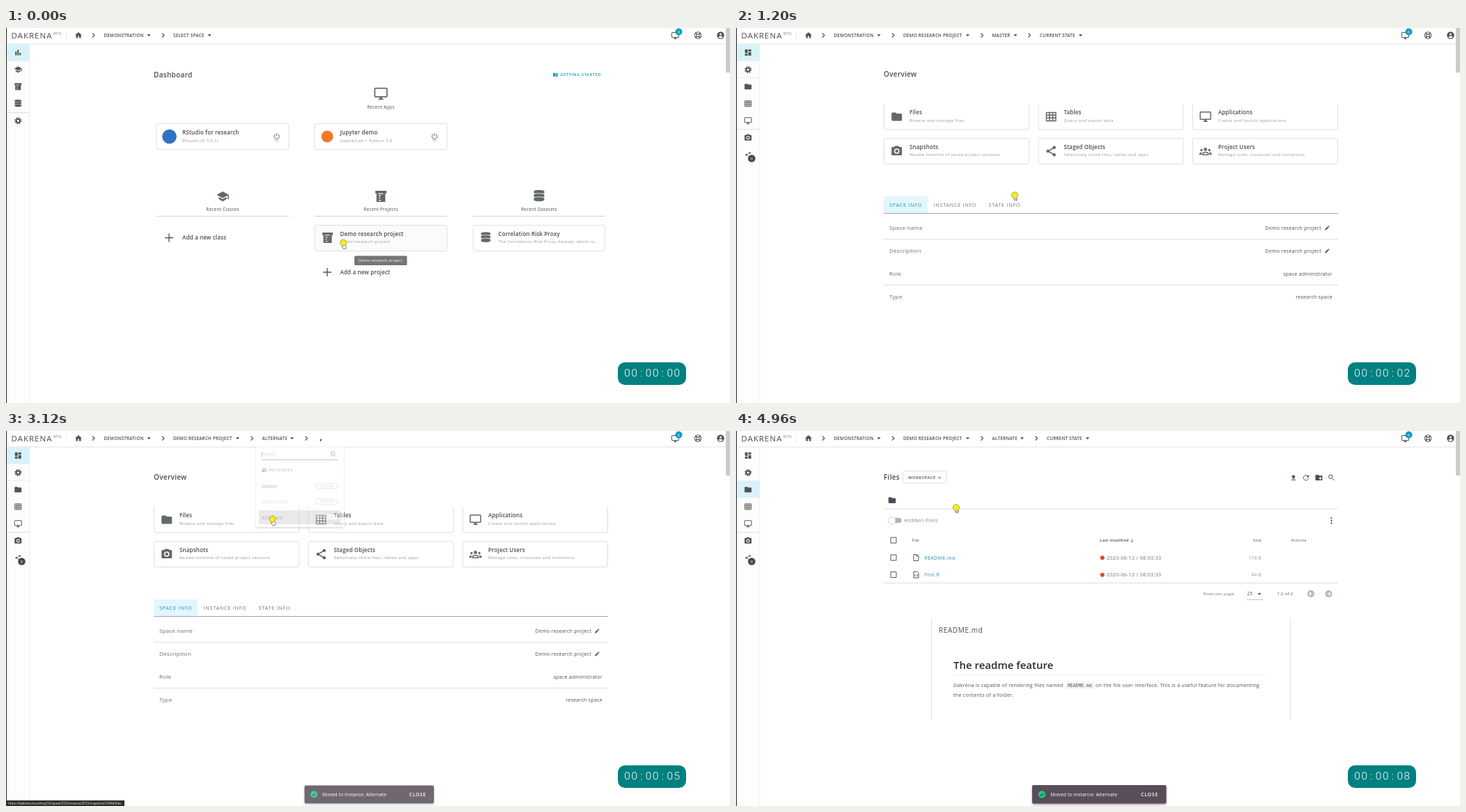
An HTML page that plays this animation: 1039x539 px, repeating every 5440 ms.

```html
<!DOCTYPE html>
<html lang="en">
<head>
<meta charset="utf-8">
<title>Workspace walkthrough</title>
<style>
html, body { margin: 0; width: 100%; height: 100%; overflow: hidden; background: #fff; }
svg { display: block; width: 1039px; height: 539px; font-family: "Open Sans", "Noto Sans", sans-serif; }
text { fill: #4c4c4c; white-space: pre; }
.icon { fill: currentColor; }
.icon .line { fill: none; stroke: currentColor; stroke-width: 2; }
.title { font-size: 10px; font-weight: 600; letter-spacing: .3px; }
.head { font-size: 8px; font-weight: 600; letter-spacing: .15px; }
.sub { font-size: 6px; letter-spacing: .38px; fill: #959595; }
.nav { font-size: 6.3px; font-weight: 600; letter-spacing: .24px; }
.cap { font-size: 6.2px; letter-spacing: .35px; text-anchor: middle; }
.tab { font-size: 7px; letter-spacing: .87px; fill: #707070; }
.lab { font-size: 8px; letter-spacing: .26px; fill: #6a6a6a; }
.val { font-size: 7px; letter-spacing: .29px; }
.para { font-size: 7px; letter-spacing: .33px; }
.cell { font-size: 7px; letter-spacing: .38px; fill: #707070; }
.small { font-size: 6px; letter-spacing: .24px; }
.row { font-size: 6.6px; letter-spacing: .22px; }
.status { font-size: 4.55px; fill: #e8e8e8; }
.end { text-anchor: end; }
</style>
</head>
<body>
<script>
const LOOP = 5440, STEP = 80;
const INK = '#505550', LEAF = '#626b63', TEAL = '#1592b5', RULE = '#dedede';

const text = (x, y, str, cls, extra = '') => `<text x="${x}" y="${y}" class="${cls}" ${extra}>${str}</text>`;
const rect = (x, y, w, h, fill, extra = '') => `<rect x="${x}" y="${y}" width="${w}" height="${h}" fill="${fill}" ${extra}/>`;
const circle = (x, y, r, fill, extra = '') => `<circle cx="${x}" cy="${y}" r="${r}" fill="${fill}" ${extra}/>`;
const path = (d, extra = '') => `<path d="${d}" ${extra}/>`;
const stroke = (d, color, width = 1) => path(d, `fill="none" stroke="${color}" stroke-width="${width}"`);
const hline = (x1, x2, y, color = RULE) => stroke(`M${x1} ${y}H${x2}`, color);
const group = (id, body, hidden) => `<g id="${id}" ${hidden ? 'display="none"' : ''}>${body}</g>`;
const line = (d, extra = '') => path(d, `class="line" ${extra}`);
const ring = (x, y, r, extra = '') => circle(x, y, r, 'none', `class="line" ${extra}`);

// Icons live in a 24 x 24 box.
const head = (x, y, r) => circle(x, y, r, 'currentColor');
const icons = {
  home: path('M10 20v-6h4v6h5v-8h3L12 3 2 12h3v8z'),
  chart: path('M4 9h4v11H4zM10 4h4v16h-4zM16 13h4v7h-4z'),
  board: path('M3 13h8V3H3zM3 21h8v-6H3zM13 21h8V11h-8zM13 3v6h8V3z'),
  gear: ring(12, 12, 5.2, 'style="stroke-width:4"') + ring(12, 12, 8.2, 'style="stroke-width:4" stroke-dasharray="3.2 3.24"'),
  folder: path('M10 4H4q-2 0-2 2v12q0 2 2 2h16q2 0 2-2V8q0-2-2-2h-8z'),
  table: line('M3 4h18v16H3zM3 9h18M3 14.500h18M9 4v16M15 4v16'),
  screen: line('M3 3h18q1 0 1 1v12q0 1-1 1H3q-1 0-1-1V4q0-1 1-1zM8 21h8') + path('M10 17h4v4h-4z'),
  camera: path('M9 2 7 4H4q-2 0-2 2v12q0 2 2 2h16q2 0 2-2V6q0-2-2-2h-3l-2-2zM12 7a5 5 0 1 1 0 10a5 5 0 1 1 0-10z', 'fill-rule="evenodd"') + head(12, 12, 3),
  share: line('M18 5 6 12l12 7') + head(18, 5, 3) + head(6, 12, 3) + head(18, 19, 3),
  users: head(12, 8.5, 3.2) + head(4.5, 10, 2.2) + head(19.5, 10, 2.2) +
    line('M6.500 19v-2q1-3 5.500-3t5.500 3v2z') + path('M0 19v-2q1-3 5-3l-1 5zM24 19v-2q-1-3-5-3l1 5z'),
  pair: head(8.5, 8, 3.4) + head(16, 8, 3) + path('M1 19v-2q1-4 7.500-4t7.500 4v2zM17 13q6 0 6 4v2h-5v-2q0-2-1-4z'),
  school: path('M5 13v4l7 4 7-4v-4l-7 4zM12 3 1 9l11 6 9-5v7h2V9z'),
  project: path('M2 2h20v5h-2v15H4V7H2z') + stroke('M7 7h9M8 11h4M8 15h3M8 19h4', '#fff', 1.5),
  data: [3, 9.500, 16].map(y => path(`M2 ${y}q0-3 10-3t10 3v2q0 3.500-10 3.500T2 ${y + 2}z`, 'stroke="#fff" stroke-width="1"')).join(''),
  search: ring(9.5, 9.5, 5.5) + line('M14 14l6 6'),
  pencil: path('M3 17v4h4L18 10l-4-4zM15 5l4 4 2-2-4-4z'),
  upload: path('M5 20h14v-2H5zM9 16h6v-6h4l-7-7-7 7h4z'),
  refresh: line('M18 7a8 8 0 1 0 2 7') + path('M13 11h8V3z'),
  file: line('M5 3h9l5 5v13H5zM14 3v5h5'),
  code: line('M5 3h9l5 5v13H5z') + line('M10 11l-2 3 2 3M14 11l2 3-2 3'),
  box: line('M4 4h16v16H4z'),
  book: path('M2 5h9v15H2zM13 5h9v15h-9z') + stroke('M15 10h5M15 14h5', '#fff', 1.500),
  down: line('M12 4v15M6 13l6 6 6-6'),
  power: line('M8 5a8 8 0 1 0 8 0M12 2v9') + line('M7 25h2M11 25h2M15 25h2'),
  life: ring(12, 12, 9) + ring(12, 12, 4) + line('M5 5l4 4M19 5l-4 4M5 19l4-4M19 19l-4-4', 'style="stroke-width:3"'),
  account: head(12, 12, 10) + circle(12, 9, 3, '#fff') + path('M6 17q2-3 6-3t6 3q-2 3-6 3t-6-3z', 'fill="#fff"'),
};
const icon = (name, x, y, size, color = INK) =>
  `<g class="icon" color="${color}" transform="translate(${x - size / 2} ${y - size / 2}) scale(${size / 24})">${icons[name]}</g>`;

const caret = (x, y = 9.3) => path(`M${x - 2.6} ${y}h5.200l-2.600 2.700z`, 'fill="#444"');
const chevron = x => stroke(`M${x - 1.5} 7.500l3 3-3 3`, '#555', 1.2);
const crumb = (x, str, arrowX) => text(x, 12.7, str, 'nav') + caret(arrowX);
const card = (x, y, w, h, fill = '#fff') => rect(x, y, w, h, fill, `rx="2.500" stroke="#dfdfdf"`);
const labels = (x, y, title, note) => text(x, y, title, 'head') + text(x, y + 10.2, note, 'sub');
const plus = (x, y) => stroke(`M${x - 6} ${y}h12M${x} ${y - 6}v12`, '#555', 1.4);

function header() {
  return hline(1, 1033, 23, '#e2e2e2') +
    text(7.5, 14.6, 'DAKRENA', '', 'font-size="11.500" letter-spacing="1"') +
    text(68, 9.6, 'BETA', '', 'font-size="4.800" letter-spacing=".2" style="fill:#888"') +
    stroke('M86.500 4v14', '#eee') + icon('home', 104, 10.5, 12) + chevron(125.5) + crumb(140.5, 'DEMONSTRATION', 205) + chevron(225.5) +
    group('crumbsHome', crumb(240, 'SELECT SPACE', 292)) +
    group('crumbsSpace', crumb(240, 'DEMO RESEARCH PROJECT', 332.5) + chevron(353)) +
    group('crumbsMaster', crumb(367.5, 'MASTER', 401) + chevron(421) + crumb(436, 'CURRENT STATE', 494.5)) +
    group('crumbsAlternate', crumb(367.5, 'ALTERNATE', 410.5) + chevron(431)) +
    group('crumbLoader', stroke('M451 14.500l1.500-3', '#333', 1.6)) +
    group('crumbState', crumb(446, 'CURRENT STATE', 504.5)) +
    icon('screen', 960.5, 11, 12) + circle(965.5, 5.5, 5, '#0c9ac4') +
    text(965.5, 7.8, '0', '', 'font-size="6" text-anchor="middle" style="fill:#fff"') +
    icon('life', 993, 10.5, 12.5) + icon('account', 1025.5, 10.5, 12.5) + rect(1033, 0, 6, 64, '#cbcbcb');
}

function sidebar() {
  const column = names => names.map((name, i) => icon(name, 17.3, 35.3 + i * 24.5, name === 'share' ? 10 : 12)).join('');
  return rect(1, 23.5, 33, 516, '#fdfdfd') + rect(1, 23.5, 33, 24, '#d9f2fa', 'id="active"') + stroke('M34 24V539', '#efefef') +
    group('sideHome', column(['chart', 'school', 'project', 'data', 'gear']) + hline(1, 34, 121.5)) +
    group('sideSpace', column(['board', 'gear', 'folder', 'table', 'screen', 'camera', 'share']) +
      hline(1, 34, 71.5, '#eee') + hline(1, 34, 145.5) + circle(22.5, 187.5, 5.3, '#4b414c') +
      text(22.5, 189.6, '0', '', 'font-size="6" text-anchor="middle" style="fill:#fff"'));
}

function dashboard() {
  const section = (x, name, str) => icon(name, x, 242, 19, LEAF) + text(x, 263, str, 'cap') + hline(x - 95, x + 95, 270.5, '#d3d3d3');
  return text(212, 70.6, 'Dashboard', 'title') + icon('book', 788.5, 67, 8, TEAL) +
    text(795.5, 69, 'GETTING STARTED', '', `font-size="5.700" font-weight="600" letter-spacing=".6" style="fill:${TEAL}"`) +
    icon('screen', 538, 94.5, 21, LEAF) + text(538, 115.5, 'Recent Apps', 'cap') +
    card(216, 137.5, 190, 37) + circle(234.5, 156, 10.3, '#2f72c4') + labels(253, 153.3, 'RStudio for research', 'RStudio (R 3.6.1)') + icon('power', 388.5, 156, 11) +
    card(443, 137.5, 190, 37) + circle(461, 156, 8.5, '#f37726') + labels(479.5, 153.3, 'Jupyter demo', 'JupyterLab + Python 3.8') + icon('power', 615, 156, 11) +
    section(311, 'school', 'Recent Classes') + section(538, 'project', 'Recent Projects') + section(765, 'data', 'Recent Datasets') +
    plus(234, 301.5) + text(253, 304.2, 'Add a new class', 'head') +
    card(443, 283.5, 190, 37, '#fbfbfb') + '<g clip-path="url(#projectClip)"><circle id="projectRipple" fill="#a9a1aa"/></g>' +
    icon('project', 461.5, 301.5, 18, LEAF) + labels(479.5, 299, 'Demo research project', 'Demo research project') +
    plus(461, 351) + text(479.5, 354, 'Add a new project', 'head') +
    card(670.5, 283.5, 189, 37) + icon('data', 688.5, 301.5, 17, LEAF) +
    labels(706.5, 299, 'Correlation Risk Proxy', 'The Correlation Risk Proxy dataset, which is...') +
    group('tooltip', rect(500, 327.5, 75.5, 13.5, '#747674', 'rx="1.500"') +
      text(506, 336.3, 'Demo research project', '', 'font-size="5.600" letter-spacing=".15" style="fill:#fff"'));
}

function overview() {
  const xs = [212, 433.5, 655];
  const tiles = [
    ['folder', 'Files', 'Browse and manage files'], ['table', 'Tables', 'Query and export data'],
    ['screen', 'Applications', 'Create and launch applications'], ['camera', 'Snapshots', 'Review timeline of saved project versions'],
    ['share', 'Staged Objects', 'Selectively share files, tables and apps'], ['users', 'Project Users', 'Manage roles, instances and invitations']];
  const frames = xs.map(x => stroke(`M${x + .5} 109V143.500q0 2.500 2.500 2.500h203q2.500 0 2.500-2.500V109`, '#dfdfdf') + card(x + .5, 158.5, 208, 37)).join('');
  const faces = tiles.map(([name, title, note], i) => {
    const x = xs[i % 3], y = i < 3 ? 124.4 : 174;
    return icon(name, x + 18.7, y + 3, 18, LEAF) + labels(x + 37, y, title, note);
  }).join('');
  const fact = (y, label, value, editable) => text(220, y + 3, label, 'lab') +
    text(editable ? 840 : 856, y + 2.5, value, 'val end') + (editable ? icon('pencil', 848.5, y + .3, 8.5) : '');
  return text(212, 69.6, 'Overview', 'title') +
    rect(212, 109, 209, 37, '#f8f8f8', 'id="filesHover"') + '<g clip-path="url(#filesClip)"><circle id="filesRipple" fill="#9f97a0"/></g>' +
    frames + faces + rect(212, 242, 63, 24.5, '#e2f7fc') + text(220, 257, 'SPACE INFO', 'tab', `style="fill:${TEAL}"`) +
    text(283.5, 257, 'INSTANCE INFO', 'tab') + text(362.5, 257, 'STATE INFO', 'tab') + hline(212, 864, 266.5, '#aaa1ab') +
    fact(287, 'Space name', 'Demo research project', true) + hline(212, 864, 303.5) +
    fact(320, 'Description', 'Demo research project', true) + fact(353, 'Role', 'space administrator') +
    hline(212, 864, 369.5) + fact(386, 'Type', 'research space');
}

function files() {
  const plum = '#51465a';
  const row = (y, name, file, size) => icon('box', 226, y, 12) + icon(file, 258.5, y, 12) +
    text(270.5, y + 2.6, name, 'cell', `style="fill:${TEAL}"`) + circle(525.7, y + .3, 3, '#f2402f') +
    text(532, y + 2.6, '2020-06-12 / 08:03:33', 'cell') + text(754, y + 2.6, size, 'row end', 'style="fill:#999"');
  const pager = (x, d) => circle(x, 234, 5, '#b9b1ba') + stroke(`M${x - 2.7 * d} 234h${5.4 * d}M${x} 231.500l${2.5 * d} 2.500l${-2.5 * d} 2.500`, '#fff', 1.1);
  return text(212, 69.6, 'Files', 'title') + card(239.5, 57.5, 62.5, 17) +
    text(247, 69, 'WORKSPACE', '', 'font-size="6" font-weight="600" letter-spacing=".45"') + stroke('M290 66l2 2 2-2', '#555') +
    icon('upload', 800, 67, 11, plum) + icon('refresh', 818, 67, 11, plum) + icon('folder', 836.5, 67, 12, plum) +
    stroke('M836 68h5M838.500 65.500v5', '#fff') + icon('search', 854.5, 67, 12, plum) +
    icon('folder', 224, 99.5, 12.5, plum) + hline(212, 864, 112) +
    rect(222, 125, 15.5, 7, '#b4aeb5', 'rx="3.500"') + circle(223.7, 128.7, 5.2, '#fff', 'stroke="#d5d1d5"') +
    text(241, 131, 'Hidden Files', 'lab', 'style="fill:#888"') + [125, 128.7, 132.4].map(y => circle(854.5, y, 1.1, '#444')).join('') +
    group('listing', icon('box', 226, 157, 12) + text(252.5, 159.3, 'File', 'small') +
      text(522, 159.3, 'Last modified', '', 'font-size="6" font-weight="600" letter-spacing=".15"') + icon('down', 568.3, 157.5, 8) +
      text(754, 159.3, 'Size', 'small end') + text(796.5, 159.3, 'Actions', 'small') +
      row(182, 'README.md', 'file', '174 B') + row(206.5, 'first.R', 'code', '44 B') + hline(212, 864, 218.5) +
      text(670.5, 236, 'Rows per page:', 'small', 'style="fill:#777"') + text(733.5, 236.4, '25', 'row') + caret(751.2, 233) +
      hline(733, 757, 242.5, '#c9c0ca') + text(776.5, 236, '1-2 of 2', 'small') + pager(825, -1) + pager(850.5, 1)) +
    group('readme', stroke('M280.500 269V416M795.500 269V416', RULE) +
      text(291, 289.6, 'README.md', '', 'font-size="10" letter-spacing=".6"') +
      text(312, 341.7, 'The readme feature', '', 'font-size="15" font-weight="600" style="fill:#2c2c2c"') + hline(312, 763, 350.5, '#f1f1f1') +
      text(312, 368, 'Dakrena is capable of rendering files named', 'para') + rect(473.5, 360, 40, 11, '#f5f5f5', 'rx="1.500"') +
      text(476, 368, 'README.md', '', 'font-size="6.450" font-family="Liberation Mono, monospace"') +
      text(516, 368, 'on the file user interface. This is a useful feature for documenting', 'para') +
      text(312, 381.8, 'the contents of a folder.', 'para'));
}

function menu() {
  const entry = (y, name, color) => text(367, y + 2.5, name, 'row', color ? `style="fill:${color}"` : '') +
    rect(444.5, y - 3.8, 32, 7.6, '#fff', 'rx="3.800" stroke="#c4bec5" stroke-width=".8"') +
    text(460.5, y + 1.6, 'EDITOR', '', 'font-size="4.600" letter-spacing=".35" text-anchor="middle" style="fill:#999"');
  return rect(359, 20.5, 125.5, 117.5, '#fff', 'rx="2" filter="url(#shadow)"') +
    text(367, 36, 'Filter', 'lab', 'style="fill:#8d8d8d"') + stroke('M367 29v9', '#555', .8) + icon('search', 470, 33.3, 12) +
    hline(367, 476, 41.5, '#7a6d80') + icon('pair', 370.7, 56, 8.5) + text(377, 58.2, 'INSTANCES', '', 'font-size="6" letter-spacing=".45"') +
    rect(363, 114, 117, 20, '#cfc8d0', 'id="choice"') +
    entry(79, 'Master') + entry(101.5, 'Distributed', '#b0b0b0') + entry(124, 'Alternate');
}

const snackbar = rect(425, 509, 192.5, 26.5, '#594d59', 'rx="2" filter="url(#shadow)"') +
  circle(439, 522.3, 5.2, '#1fc77e') + stroke('M436.500 522.500l1.800 1.800 3.400-3.600', '#4a414b', 1.1) +
  text(451.5, 524.8, 'Moved to instance: Alternate', '', 'font-size="7" letter-spacing=".08" style="fill:#fff"') +
  text(581, 524.8, 'CLOSE', '', 'font-size="7" font-weight="600" letter-spacing=".75" style="fill:#fff"');
const clock = rect(878, 480.5, 98, 32.5, '#008080', 'rx="10.500"') +
  `<text id="time" x="${Array.from({ length: 8 }, (_, i) => 891.5 + 10.2 * i).join(' ')}" y="500.500" text-anchor="middle" style="font:300 15.500px Roboto,sans-serif;fill:#fff"></text>`;
const pointer = group('hand', path('M-.5-1q1.200-1 1.700.3v2.700l2.400.6q1 .4.700 1.700l-.7 3.200H0L-2 4.700q-.3-1.300 1.500-.7z', 'fill="#fff" stroke="#555" stroke-width=".7"')) +
  group('arrow', path('M-1-1v7l1.600-1.400 1.300 2.200 1.100-.7-1.200-2H4z', 'fill="#fff" stroke="#555" stroke-width=".7"'));

document.body.innerHTML = `<svg viewBox="0 0 1039 539"><defs>
  <filter id="shadow" x="-10%" y="-20%" width="120%" height="150%"><feDropShadow dx="0" dy="1.500" stdDeviation="1.800" flood-opacity=".4"/></filter>
  <clipPath id="filesClip">${rect(212, 109, 209, 37, '#000')}</clipPath>
  <clipPath id="projectClip">${rect(443, 283.5, 190, 37, '#000')}</clipPath></defs>
  ${rect(0, 0, 1039, 539, '#fff')}${group('dashboard', dashboard())}${group('overview', overview())}${group('files', files())}
  ${sidebar()}${header()}${rect(0, 0, 1, 539, '#222')}${group('menu', menu())}${group('snackbar', snackbar)}
  ${group('status', rect(0, 531, 170, 8, '#2d2d2d', 'id="statusBar"') + '<text id="statusText" class="status" x="3" y="536.700"></text>')}
  ${clock}<g id="cursor"><g transform="translate(0 1.500)">${pointer}</g><circle id="spot" fill="#fbec1c" stroke="#8f8720" stroke-width=".7"/></g></svg>`;

const $ = id => document.getElementById(id);
const set = (id, attrs) => Object.entries(attrs).forEach(([key, value]) => $(id).setAttribute(key, value));
const show = (id, on) => set(id, { display: on ? 'inline' : 'none' });
const clamp = v => Math.max(0, Math.min(1, v));
const ease = v => v * v * (3 - 2 * v);

// time, x, y
const moves = [[0, 484, 308.5], [400, 483.5, 309.5], [960, 483.5, 309.5], [1520, 271.5, 133.5], [1760, 271.5, 133.5],
  [2240, 385, 12], [2400, 385, 12], [2560, 394, 97], [2640, 394, 98], [2800, 382.5, 126.5], [3520, 382.5, 126.5],
  [4000, 294, 122.5], [4160, 294, 122.5], [4560, 316, 110]];
const clicks = [80, 2240, 2800, 4000];

function cursorAt(t) {
  const next = moves.findIndex(m => m[0] > t);
  if (next < 0) return moves.at(-1).slice(1);
  const [a, b] = [moves[next - 1], moves[next]];
  const k = ease((t - a[0]) / (b[0] - a[0]));
  return [a[1] + (b[1] - a[1]) * k, a[2] + (b[2] - a[2]) * k];
}

function ripple(id, age, from, to, y) {
  const k = clamp(age / 94);
  set(id, { cx: from + (to - from) * k, cy: y, r: age < 0 ? 0 : 20 + age * .96, opacity: 1 - clamp((age - 80) / 240) });
}

function statusAt(t) {
  const url = (instance, snapshot) => `https://dakrena.cloud/org/32/space/523/instance/${instance}/snapshot/${snapshot}/files`;
  if (t >= 480 && t < 880) return ['Waiting for api.dakrena.cloud...', 347];
  if (t >= 1440 && t < 1920) return [url(3070, 24346), 170];
  if (t >= 3120 && t < 4240) return [url(3072, 24348), 170];
  return ['', 0];
}

function draw(t) {
  const inSpace = t >= 400, alternate = t >= 2960, onFiles = t >= 4240;
  show('dashboard', t < 480);
  show('tooltip', t < 320);
  show('overview', t >= 640 && !onFiles);
  show('files', onFiles);
  show('listing', t >= 4400);
  show('readme', t >= 4480);
  show('crumbsHome', !inSpace);
  show('sideHome', !inSpace);
  show('crumbsSpace', inSpace);
  show('sideSpace', inSpace);
  show('crumbsMaster', inSpace && !alternate);
  show('crumbsAlternate', alternate);
  show('crumbLoader', alternate && t < 3200);
  show('crumbState', t >= 3200);
  set('active', { y: onFiles ? 72 : 23.5 });

  const hover = (t >= 1440 && t < 1920) || t >= 3200;
  set('filesHover', { fill: t >= 4080 ? '#e2dce3' : '#f8f8f8', opacity: hover ? 1 : 0 });
  ripple('filesRipple', t - 4000, 294, 316.5, 127.5);
  ripple('projectRipple', t - 80, 484, 538, 302);

  set('menu', { opacity: t < 2960 ? clamp((t - 2240) / 240) : clamp((3200 - t) / 200) });
  set('choice', { opacity: t >= 2720 ? 1 : 0 });

  const rise = t < 3040 ? 0 : t < 3120 ? .45 : t < 3200 ? .85 : 1;
  const scale = .76 + .24 * rise;
  set('snackbar', { opacity: rise, transform: `translate(521.300 522) scale(${scale}) translate(-521.300 -522)` });

  const [message, width] = statusAt(t);
  show('status', width > 0);
  set('statusBar', { width });
  $('statusText').textContent = message;
  $('time').textContent = '00:00:0' + Math.max(0, Math.floor((t + 160) / 640));

  const [x, y] = cursorAt(t);
  const age = Math.min(...clicks.map(c => t >= c ? t - c : Infinity));
  const pressed = age < 240;
  set('cursor', { transform: `translate(${x} ${y})` });
  set('spot', { r: pressed ? 12 - Math.abs(age - 80) / 20 : 4.5 });
  show('hand', !pressed && (t < 400 || (t >= 1440 && t < 2400) || (t >= 2720 && t < 4240)));
  show('arrow', !pressed && ((t >= 400 && t < 1440) || t >= 4240));
}

const start = performance.now();
function frame() {
  const t = (performance.now() - start) % LOOP;
  draw(Math.floor(t / STEP) * STEP);
  requestAnimationFrame(frame);
}
draw(0);
requestAnimationFrame(frame);
</script>
</body>
</html>
```
